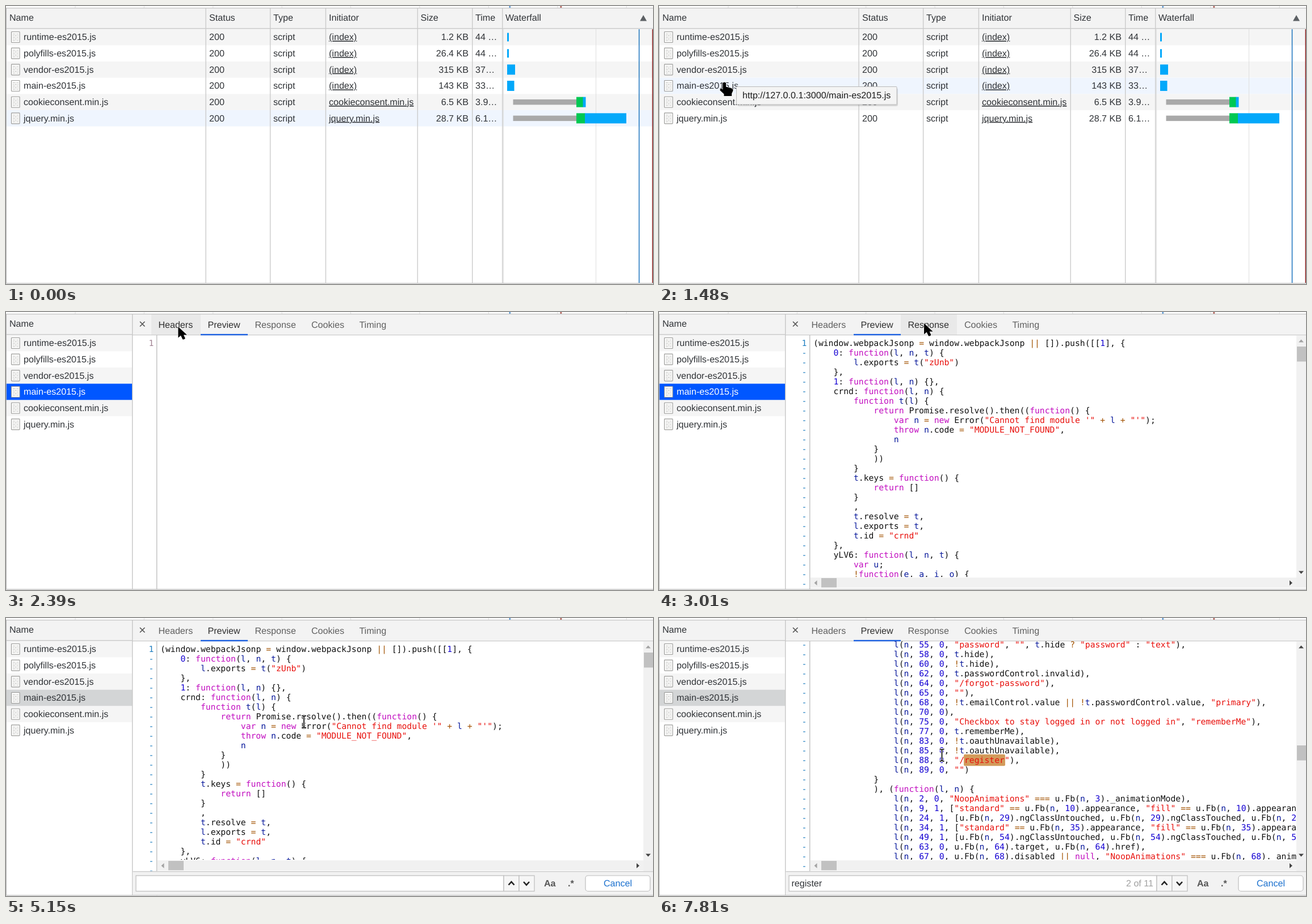
Recreate the animation shown at these times as an HTML page. Size 1140x491 px, loop 8000 ms.

```html
<!DOCTYPE html>
<html lang="en">
<head>
<meta charset="utf-8">
<title>Network panel search</title>
<style>
html, body { margin: 0; width: 100%; height: 100%; overflow: hidden; background: #fff; }
svg { display: block; width: 1140px; height: 491px; }
text { font: 16.1px "Liberation Sans", Arial, sans-serif; fill: #303337; white-space: pre; text-rendering: geometricPrecision; }
.code text { font: 14.72px "DejaVu Sans Mono", monospace; fill: #111; }
.code .kw { fill: #c20fc0; }
.code .num { fill: #1400d2; }
.code .str { fill: #e8100c; }
.code .var { fill: #0a1a9c; }
.code .op { fill: #a25200; }
.code .gut { fill: #1c7dc0; }
.link { text-decoration: underline; }
.tab { fill: #606060; }
.tab.on { fill: #303030; }
.bold { font-weight: bold; fill: #555; }
</style>
</head>
<body>
<svg id="stage" viewBox="0 0 1140 491"></svg>
<script>
const LOOP = 8000, ROW = 28.67, TOP = 40.6, CH = 8.862, LINE = 17;
const stage = document.getElementById('stage');

function el(parent, tag, attrs = {}, content) {
  const node = document.createElementNS('http://www.w3.org/2000/svg', tag);
  for (const k in attrs) node.setAttribute(k, attrs[k]);
  if (content !== undefined) node.textContent = content;
  parent.appendChild(node);
  return node;
}
const group = (p, attrs) => el(p, 'g', attrs);
const rect = (p, x, y, width, height, fill, more) => el(p, 'rect', { x, y, width, height, fill, ...more });
const text = (p, x, y, s, more) => el(p, 'text', { x, y, ...more }, s);
const path = (p, d, fill, more) => el(p, 'path', { d, fill, ...more });
const show = (node, on) => { node.style.display = on ? '' : 'none'; };
const rowTop = i => TOP + i * ROW;

// ---- timeline strip and request list
rect(stage, 0, 0, 1140, 491, '#fff');
for (let i = 1; i < 10; i++) rect(stage, i * 121.4, 0, 1, 3, '#ddd');
rect(stage, 887, 0, 1.6, 3, '#1a6fc0');
rect(stage, 977, 0, 1.6, 3, '#8c1c10');

const list = group(stage);
for (let i = 0; i < 6; i += 2) rect(list, 1, rowTop(i), 1139, ROW, '#f5f5f5');
const hover = rect(list, 1, 0, 1139, ROW, '#eff5fe');
const picked = rect(list, 1, rowTop(3), 1139, ROW, '#0057ff');

const files = ['runtime-es2015', 'polyfills-es2015', 'vendor-es2015', 'main-es2015', 'cookieconsent.min', 'jquery.min'];
const sizes = ['1.2 KB', '26.4 KB', '315 KB', '143 KB', '6.5 KB', '28.7 KB'];
const times = ['44 …', '44 …', '37…', '33…', '3.9…', '6.1…'];
const names = files.map((f, i) => {
  const y = rowTop(i) + 4.9;
  rect(list, 9.5, y, 14.6, 19, '#fbfbfa', { stroke: '#9a9a98', 'stroke-width': 1.1, rx: 0.8 });
  for (let k = 0; k < 5; k++) {
    path(list, `M12 ${y + 4 + k * 2.9}h9.6`, 'none', { stroke: '#c2c2c0', 'stroke-dasharray': k % 2 ? '2 1 4 1' : '4 1 1 1' });
  }
  return text(list, 31, rowTop(i) + 19.7, f + '.js');
});
rect(list, 0, 4, 1140, 36, '#f3f3f3');
rect(list, 0, 39, 1140, 1.5, '#cacaca');

// ---- table columns and waterfall
const table = group(stage);
const columns = [[358, 'Status'], [471, 'Type'], [569, 'Initiator'], [730.5, 'Size'], [827, 'Time'], [880, 'Waterfall']];
for (const [x, s] of columns) text(table, x, 26.3, s);
path(table, 'M1117 26.5L1123 16L1129 26.5Z', '#5c6064');
files.forEach((f, i) => {
  const y = rowTop(i) + 19.7;
  text(table, 358, y, '200');
  text(table, 471, y, 'script');
  text(table, 569, y, i < 4 ? '(index)' : f + '.js', { class: 'link' });
  text(table, 815, y, sizes[i], { 'text-anchor': 'end' });
  text(table, 827, y, times[i]);
});
for (const x of [351.4, 464.9, 562.7, 724.5, 821, 874]) rect(table, x, 4, 1.4, 485, '#cbcbcb');
for (const x of [876, 1039]) rect(table, x, 41, 1, 448, '#dfdfdf');
const BLUE = '#03a8fa', GREEN = '#00c853', GREY = '#a9a9a9';
const bars = [
  [0, 883, 3, 15, BLUE], [1, 883, 3, 15, BLUE], [2, 883, 14, 18, BLUE], [3, 883, 12.5, 18, BLUE],
  [4, 893.5, 112, 9.5, GREY], [4, 1005, 12, 18, GREEN], [4, 1016.5, 5, 18, BLUE],
  [5, 893.5, 112, 9.5, GREY], [5, 1005, 15.5, 18, GREEN], [5, 1020, 73, 18, BLUE]
];
for (const [i, x, w, h, fill] of bars) rect(table, x, rowTop(i) + 14.4 - h / 2, w, h, fill);
rect(table, 1114.8, 41, 1.5, 448, '#1a72bd');
rect(table, 1138.6, 41, 1.4, 448, '#8c2020');

// ---- detail panel
const panel = group(stage);
rect(panel, 222, 4, 918, 486, '#fff');
rect(panel, 222, 4, 918, 36, '#f3f3f3');
const tabSpans = [['Headers', 256, 343], ['Preview', 343, 426], ['Response', 426, 525], ['Cookies', 525.5, 609.5], ['Timing', 610, 683]];
const tabs = tabSpans.map(([s, a, b]) => ({
  a, b,
  back: rect(panel, a, 4, b - a, 36, '#e9e9e9'),
  label: text(panel, a + 12.4, 27.7, s, { class: 'tab' })
}));
path(panel, 'M236 17L244.5 25.5M244.5 17L236 25.5', 'none', { stroke: '#555', 'stroke-width': 1.7 });
rect(panel, 222, 40, 918, 1.2, '#cacaca');
rect(panel, 343, 38.8, 83, 2.4, '#1a5fe0');
rect(panel, 222, 4, 1.4, 486, '#c6c6c6');
rect(panel, 265, 41, 1.4, 449, '#c0c0c0');

const clip = rect(el(el(stage, 'defs'), 'clipPath', { id: 'area' }), 223, 41, 900, 427, '#000');
const gutterClip = el(stage.querySelector('defs'), 'clipPath', { id: 'gutter' });
rect(gutterClip, 223, 41, 43, 446, '#000');

const KEYWORDS = /^(function|return|var|new|throw|null)$/;
const TOKENS = /("[^"]*")|(\.[A-Za-z_]\w*)|([A-Za-z_$]\w*)|(\d+)|([=!&|?+-]+)|([^"\w=!&|?+-])/g;

function paint(node, src) {
  let last = '';
  for (const [s, str, prop, id, num, op] of src.matchAll(TOKENS)) {
    let cls = '';
    if (str) cls = 'str';
    else if (id) cls = KEYWORDS.test(id) ? 'kw' : /^[lnteaio]$/.test(id) || last === 'var' ? 'var' : '';
    else if (num) cls = 'num';
    else if (op) cls = 'op';
    el(node, 'tspan', cls ? { class: cls } : {}, s);
    if (s !== ' ') last = s;
  }
}

// Each source line starts with its indent level in units of four columns.
function codeView(src, base, first, mark) {
  const view = group(panel, { class: 'code' });
  const gutter = group(view, { 'clip-path': 'url(#gutter)' });
  const body = group(view, { 'clip-path': 'url(#area)' });
  const lines = src.trim().split('\n');
  if (mark) rect(body, 272 + mark[1] * CH - 0.8, base + mark[0] * LINE - 15.2, 8 * CH + 2, 20.4, '#d39b5b', { rx: 2 });
  lines.forEach((line, i) => {
    const node = text(body, 272 + line[0] * 4 * CH, base + i * LINE, undefined);
    paint(node, line.slice(2));
  });
  for (let i = 0; i <= lines.length; i++) {
    text(gutter, 251.6, base + i * LINE, i || !first ? '-' : '1', { class: 'gut' });
  }
  return view;
}

const blank = group(panel, { class: 'code' });
text(blank, 251.6, 60, '1', { style: 'fill:#a08292' });

const startView = codeView(`
0 (window.webpackJsonp = window.webpackJsonp || []).push([[1], {
1 0: function(l, n, t) {
2 l.exports = t("zUnb")
1 },
1 1: function(l, n) {},
1 crnd: function(l, n) {
2 function t(l) {
3 return Promise.resolve().then((function() {
4 var n = new Error("Cannot find module '" + l + "'");
4 throw n.code = "MODULE_NOT_FOUND",
4 n
3 }
3 ))
2 }
2 t.keys = function() {
3 return []
2 }
2 ,
2 t.resolve = t,
2 l.exports = t,
2 t.id = "crnd"
1 },
1 yLV6: function(l, n, t) {
2 var u;
2 !function(e, a, i, o) {`, 60, true);

const firstHit = codeView(`
3 }
3 ), [Pi.b]), u.sb(77, 540672, null, 0, N.g, [[8, null], [8, null], [6, N.o], [2, N.D]
4 form: [0, "form"]
3 }, null), u.Kb(2048, null, N.p, null, [N.g]), u.sb(79, 16384, null, 0, N.q, [[4, N.p]
3 u.Nb(80, 0, [" ", " "])), u.Hb(131072, y.j, [y.k, u.h]), (l()(),
3 u.ib(16777216, null, null, 1, null, qi)), u.sb(83, 16384, null, 0, k.l, [u.O, u.L],
4 ngIf: [0, "ngIf"]
3 }, null), (l()(),
3 u.ib(16777216, null, null, 1, null, Bi)), u.sb(85, 16384, null, 0, k.l, [u.O, u.L],
4 ngIf: [0, "ngIf"]
3 }, null), (l()(),
3 u.tb(86, 0, null, null, 4, "div", [["id", "newCustomerLink"]], null, null, null, null
3 u.tb(87, 0, null, null, 3, "a", [["class", "primary-link"], ["routerLink", "/register"
4 var e = !0;
4 return "click" === n && (e = !1 !== u.Fb(l, 88).onClick(t.button, t.ctrlKey, t.metaKey
4 e
3 }
3 ), null, null)), u.sb(88, 671744, null, 0, xn.m, [xn.k, xn.a, k.h], {
4 routerLink: [0, "routerLink"]
3 }, null), u.sb(89, 8536064, null, 0, y.e, [y.k, u.k, u.h], {
4 translate: [0, "translate"]
3 }, null), (l()(),
3 u.Nb(-1, null, ["NO_CUSTOMER"]))], (function(l, n) {`, 52, false, [12, 89]);

const secondHit = codeView(`
4 l(n, 55, 0, "password", "", t.hide ? "password" : "text"),
4 l(n, 58, 0, t.hide),
4 l(n, 60, 0, !t.hide),
4 l(n, 62, 0, t.passwordControl.invalid),
4 l(n, 64, 0, "/forgot-password"),
4 l(n, 65, 0, ""),
4 l(n, 68, 0, !t.emailControl.value || !t.passwordControl.value, "primary"),
4 l(n, 70, 0),
4 l(n, 75, 0, "Checkbox to stay logged in or not logged in", "rememberMe"),
4 l(n, 77, 0, t.rememberMe),
4 l(n, 83, 0, !t.oauthUnavailable),
4 l(n, 85, 0, !t.oauthUnavailable),
4 l(n, 88, 0, "/register"),
4 l(n, 89, 0, "")
3 }
3 ), (function(l, n) {
4 l(n, 2, 0, "NoopAnimations" === u.Fb(n, 3)._animationMode),
4 l(n, 9, 1, ["standard" == u.Fb(n, 10).appearance, "fill" == u.Fb(n, 10).appearance
4 l(n, 24, 1, [u.Fb(n, 29).ngClassUntouched, u.Fb(n, 29).ngClassTouched, u.Fb(n, 29)
4 l(n, 34, 1, ["standard" == u.Fb(n, 35).appearance, "fill" == u.Fb(n, 35).appearance
4 l(n, 49, 1, [u.Fb(n, 54).ngClassUntouched, u.Fb(n, 54).ngClassTouched, u.Fb(n, 54)
4 l(n, 63, 0, u.Fb(n, 64).target, u.Fb(n, 64).href),
4 l(n, 67, 0, u.Fb(n, 68).disabled || null, "NoopAnimations" === u.Fb(n, 68)._animationMode`, 52, false, [12, 30]);

// ---- scrollbars
const scroll = group(panel);
rect(scroll, 1123, 41, 17, 446, '#f1f1f1');
const upArrow = path(scroll, 'M1127 53.5L1131.5 48.5L1136 53.5Z', '#a3a3a3');
const thumb = rect(scroll, 1124, 61, 16, 26.5, '#c1c1c1');
const foot = group(scroll);
rect(foot, 267, 469, 856, 18, '#f1f1f1');
rect(foot, 1123, 469, 17, 18, '#efefef');
rect(foot, 286, 470, 27, 16.5, '#c1c1c1');
path(foot, 'M278.5 474L273.5 478.5L278.5 483Z', '#a3a3a3');
path(foot, 'M1111 474L1116 478.5L1111 483Z', '#444');
path(foot, 'M1127 457.5L1131.5 462.5L1136 457.5Z', '#444');

// ---- search bar
const search = group(panel);
rect(search, 223.4, 447, 917, 42, '#f2f2f2');
rect(search, 223.4, 447.2, 917, 1.3, '#cacaca');
const box = { stroke: '#bdbdbd', 'stroke-width': 1.2 };
rect(search, 229, 455, 648, 27.5, '#fff', box);
rect(search, 877, 455, 27, 27.5, '#f6f6f6', box);
rect(search, 904, 455, 27, 27.5, '#f6f6f6', box);
path(search, 'M885.5 471.5L890.5 466L895.5 471.5M912 466L917 471.5L922 466', 'none', { stroke: '#222', 'stroke-width': 2.6 });
text(search, 948, 474.2, 'Aa', { class: 'bold' });
text(search, 990, 474.2, '.*', { class: 'bold' });
rect(search, 1021, 455, 114, 27.5, '#fff', { ...box, rx: 4.5 });
text(search, 1078, 474.2, 'Cancel', { 'text-anchor': 'middle', style: 'fill:#1a70ce' });
const query = text(search, 233.5, 474.2, 'register');
const count = text(search, 871, 474.2, '', { 'text-anchor': 'end', style: 'fill:#a0a0a0' });
const caret = rect(search, 0, 460.5, 1.2, 18.5, '#111');

// ---- frame lines above both layouts
text(stage, 6, 26.3, 'Name');
rect(stage, 0, 3, 1140, 1.3, '#c6c6c6');
rect(stage, 0, 4, 1, 486, '#b4b4b4');
rect(stage, 0, 489.2, 1140, 1.3, '#bcbcbc');

// ---- tooltip, click pulse, pointers
const tip = group(stage);
rect(tip, 138, 145, 283, 32, '#000', { opacity: 0.12, rx: 3 });
rect(tip, 136.5, 142.5, 282.5, 31.5, '#f4f4f4', { stroke: '#b9b9b9', rx: 1 });
text(tip, 147, 163.3, 'http://127.0.0.1:3000/main-es2015.js', { style: 'fill:#1c1c1c' });

const pulse = el(stage, 'circle', { r: 12.5, fill: '#56b5e8' });
const outline = { stroke: '#fff', 'stroke-width': 1.2, 'paint-order': 'stroke', 'stroke-linejoin': 'round' };
const pointers = {
  arrow: path(stage, 'M0 0V19.6L4.6 15.6L8 22.4Q11 23 12.4 20.6L9.6 14.6H15.6Z', '#000', outline),
  hand: path(stage, 'M-2.6 1.5Q0 -1.5 3 1.5V8L12 10.5Q15.5 11.5 15.5 15L13.2 20V24.5H-0.5V21L-7.5 14.5Q-8 11 -4.5 11.5L-2.6 13Z', '#000', outline),
  beam: path(stage, 'M-4 -10.3Q-0.7 -10.3 0 -8.8Q0.7 -10.3 4 -10.3M0 -9V9.5M-4 10.8Q-0.7 10.8 0 9.3Q0.7 10.8 4 10.8', 'none', { stroke: '#111', 'stroke-width': 1.8 })
};
const beamGlow = path(stage, pointers.beam.getAttribute('d'), 'none', { stroke: '#fff', 'stroke-width': 4 });
stage.insertBefore(beamGlow, pointers.beam);

const track = [
  [240, 128, 233], [450, 122, 190], [600, 116, 142], [700, 114, 117], [890, 115, 137],
  [1069, 115, 137], [1070, 115, 134.5], [1900, 115, 134.5], [2060, 184, 90], [2270, 255, 47],
  [2390, 303, 26], [2600, 380, 23], [2790, 455, 20], [2930, 464, 21], [3010, 467, 20],
  [3160, 467, 20], [3330, 530, 32], [3450, 590, 75], [3560, 612, 140], [3660, 590, 195],
  [3740, 557, 214], [3840, 525, 183], [7400, 525, 183], [7660, 498.5, 242]
];
function pointerAt(t) {
  if (t < track[0][0]) return null;
  const i = track.findIndex(k => k[0] > t);
  if (i < 0) return track[track.length - 1].slice(1);
  const [t0, x0, y0] = track[i - 1], [t1, x1, y1] = track[i];
  const f = (t - t0) / (t1 - t0);
  return [x0 + (x1 - x0) * f, y0 + (y1 - y0) * f];
}

const CLICKS = [1610, 4150], OPEN = 1660, LOADED = 2510, FIND = 4580, HIT1 = 5740, HIT2 = 7810;
const caretOn = [[FIND, 5150, 234], [5660, HIT1, 234], [HIT1, 6250, 287], [6780, 7440, 287]];

function draw(t) {
  const open = t >= OPEN, find = t >= FIND, hit = t >= HIT1;
  const pos = pointerAt(t);
  const [x, y] = pos || [0, -99];

  show(table, !open);
  show(panel, open);
  show(tip, t >= 1480 && !open);

  const overList = pos && y > TOP && (!open || x < 222);
  const row = t < 50 ? 5 : overList ? Math.floor((y - TOP) / ROW) : -1;
  show(hover, row >= 0 && row < 6);
  if (row >= 0) hover.setAttribute('y', rowTop(row));
  const focused = t < CLICKS[1];
  show(picked, open);
  picked.setAttribute('fill', focused ? '#0057ff' : '#d3d5d6');
  names[3].style.fill = open && focused ? '#fff' : '';

  tabs.forEach((tab, i) => {
    const over = open && y < 40 && x >= tab.a && x < tab.b;
    show(tab.back, over);
    tab.label.classList.toggle('on', over || i === 1);
  });

  show(blank, t < LOADED);
  show(scroll, t >= LOADED);
  show(startView, t >= LOADED && !hit);
  show(firstHit, hit && t < HIT2);
  show(secondHit, t >= HIT2);
  clip.setAttribute('height', find ? 386 : 427);
  foot.setAttribute('transform', `translate(0 ${find ? -41 : 0})`);
  thumb.setAttribute('y', !hit ? 61 : t < HIT2 ? 223.5 : 225);
  upArrow.setAttribute('fill', hit ? '#444' : '#a3a3a3');

  show(search, find);
  show(query, hit);
  count.textContent = hit ? (t < HIT2 ? '1 of 11' : '2 of 11') : '';
  const blink = caretOn.find(c => t >= c[0] && t < c[1]);
  show(caret, blink);
  if (blink) caret.setAttribute('x', blink[2]);

  const age = t - (t < CLICKS[1] ? CLICKS[0] : CLICKS[1]);
  const glow = age < 0 ? 0 : Math.min(1, Math.max(0, (260 - age) / 160));
  pulse.setAttribute('opacity', glow * 0.92);
  const kind = !pos ? '' : overList ? 'hand' : open && x > 266 && y > 41 && t >= LOADED ? 'beam' : 'arrow';
  for (const k in pointers) show(pointers[k], k === kind);
  show(beamGlow, kind === 'beam');
  const at = `translate(${x.toFixed(2)} ${y.toFixed(2)})`;
  for (const node of [pulse, beamGlow, ...Object.values(pointers)]) node.setAttribute('transform', at);
}

const begin = performance.now();
function tick() {
  draw((performance.now() - begin) % LOOP);
  requestAnimationFrame(tick);
}
tick();
</script>
</body>
</html>
```
